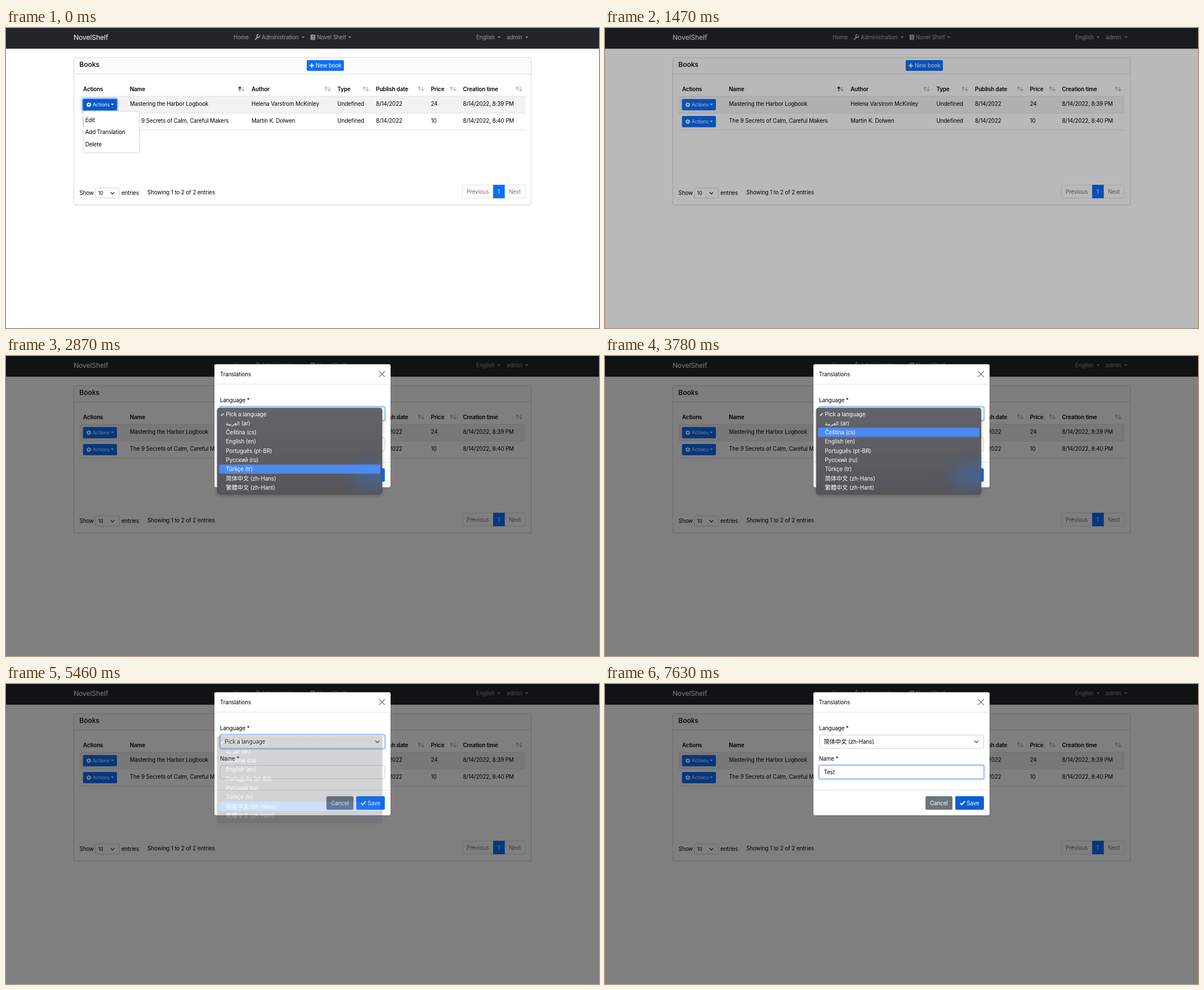
Animation of 1053x532 px, one loop 8 s. Source, as an HTML page:

```html
<!DOCTYPE html>
<html lang="en">
<head>
<meta charset="utf-8">
<title>Book list</title>
<style>
html, body { margin: 0; width: 100%; height: 100%; overflow: hidden; background: #fff; }
svg { display: block; width: 100vw; height: 100vh; }
text {
  font: 9.8px Inter, "Noto Sans CJK SC", "DejaVu Sans", sans-serif;
  letter-spacing: -.01em; fill: #000; white-space: pre;
}
.b { font-weight: 600; }
.s { font-size: 8.6px; }
.w { fill: #fff; }
.nav { fill: #9b9da0; }
.mute { fill: #6c757d; }
.brand { font-size: 12.2px; fill: #fff; }
.head { font-size: 12.2px; font-weight: 500; }
.cjk { font-size: 10.2px; letter-spacing: 0; }
.ar { font-family: "DejaVu Sans", sans-serif; font-size: 9px; letter-spacing: 0; }
</style>
</head>
<body>
<svg id="stage" viewBox="0 0 1053 532" preserveAspectRatio="none"></svg>
<script>
const LOOP = 8000, TICK = 70;
const BLUE = '#0d6efd', LINE = '#dee2e6';

// Drawing helpers
const text = (x, y, str, cls = '') => `<text x="${x}" y="${y}" class="${cls}">${str}</text>`;
const rect = (x, y, w, h, fill, r = 0, extra = '') =>
  `<rect x="${x}" y="${y}" width="${w}" height="${h}" rx="${r}" fill="${fill}" ${extra}/>`;
const path = (d, stroke, width = 1, extra = '') =>
  `<path d="${d}" fill="none" stroke="${stroke}" stroke-width="${width}" ${extra}/>`;
const hline = (x, y, w, color = LINE) => path(`M${x} ${y}h${w}`, color);
const group = (id, body, extra = '') => `<g id="${id}" ${extra}>${body}</g>`;
const caret = (x, y, fill) => `<path d="M${x} ${y}h5.4l-2.7 2.8z" fill="${fill}"/>`;
const chevron = (x, y, s = 3.3) =>
  path(`M${x - s} ${y - s / 2}l${s} ${s}l${s} ${-s}`, '#343a40', 1.3, 'stroke-linecap="round" stroke-linejoin="round"');
const tick = (x, y, s, width) => path(`M${x} ${y}l${s} ${s}l${s * 2} ${-s * 2.2}`, '#fff', width);

function sortIcon(x, active) {
  const up = path(`M${x - 2.8} 112V104.6M${x - 5.5} 107.3l2.7 -2.9l2.7 2.9`, active ? '#222' : '#b5b5b5', 1.3);
  const down = path(`M${x + 2.8} 104V111.4M${x + .1} 108.7l2.7 2.9l2.7 -2.9`, '#b5b5b5', 1.3);
  return up + down;
}

function gear(x, y) {
  return `<g fill="none" stroke="#fff"><circle cx="${x}" cy="${y}" r="2.4" stroke-width="1.9"/>
    <circle cx="${x}" cy="${y}" r="3.6" stroke-width="1.5" stroke-dasharray="1.88"/></g>`;
}

const actionFace = y => gear(147, y + 10) + text(154, y + 13.1, 'Actions', 's w') + caret(186.2, y + 8.2, '#fff');
const actionButton = y => rect(136.7, y, 60.3, 20, BLUE, 2) + actionFace(y);

function focusRing(id, y, h) {
  return group(id,
    rect(379.3, y - 1.2, 294.4, h + 2.4, 'none', 3.5, 'stroke="#0d6efd" stroke-opacity=".27" stroke-width="2.5"') +
    rect(380.5, y, 292, h, 'none', 2.5, 'stroke="#86b7fe"'));
}

function navbar() {
  const gray = '#9b9da0';
  return rect(0, 0, 1053, 36.7, '#222529') +
    text(120, 21, 'NovelShelf', 'brand') +
    text(404, 20, 'Home', 'nav') +
    path('M442.8 20.2l3.8 -3.8', gray, 2.2, 'stroke-linecap="round"') +
    path('M450.2 13.5a2.5 2.5 0 1 1 -2 -1.7', gray, 1.9) +
    text(454, 20, 'Administration', 'nav') + caret(525, 15, gray) +
    rect(540.8, 11.8, 8.4, 9.4, gray, 1.2) +
    path('M543.2 14.2h4.2M543.2 16h4.2M542.3 19.3h6.4', '#222529', .8) +
    text(552, 20, 'Novel Shelf', 'nav') + caret(607.7, 15, gray) +
    text(835, 20, 'English', 'nav') + caret(873, 15, gray) +
    text(889, 20, 'admin', 'nav') + caret(922.2, 15, gray);
}

function page() {
  const cols = [137, 220, 436, 588.5, 657, 754.5, 811.5];
  const heads = ['Actions', 'Name', 'Author', 'Type', 'Publish date', 'Price', 'Creation time'];
  const rows = [
    ['Mastering the Harbor Logbook', 'Helena Varstrom McKinley', 'Undefined', '8/14/2022', '24', '8/14/2022, 8:39 PM'],
    ['The 9 Secrets of Calm, Careful Makers', 'Martin K. Dolwen', 'Undefined', '8/14/2022', '10', '8/14/2022, 8:40 PM']
  ];
  return rect(0, 0, 1053, 532, '#fff') + navbar() +
    rect(120.5, 52.5, 812, 261, '#fff', 2.5, 'stroke="#dcdcdc" filter="url(#soft)"') +
    rect(121, 53, 811, 28, '#000', 2, 'fill-opacity=".01"') + hline(121, 81.5, 811, '#dcdcdc') +
    text(130.3, 69.3, 'Books', 'head') +
    rect(534, 57, 66, 19, BLUE, 2) + path('M538.9 66.5h8M542.9 62.5v8', '#fff', 1.8) +
    text(549.7, 70, 'New book', 'w') +
    rect(130.5, 121, 792, 30, '#f2f2f2') +
    [121, 151, 181].map(y => hline(130.5, y, 792)).join('') +
    heads.map((h, i) => text(cols[i], 111.6, h, 'b')).join('') +
    [418, 571, 639, 737, 794, 911].map((x, i) => sortIcon(x, i === 0)).join('') +
    rows.map((r, n) => r.map((c, i) => text(cols[i + 1], 137.5 + 30 * n, c)).join('')).join('') +
    actionButton(126) + actionButton(156) +
    text(130.5, 296, 'Show') + rect(158.5, 283.5, 43, 18, '#fff', 2, 'stroke="#ced4da"') +
    text(163.8, 296, '10', 's') + chevron(189, 293, 3) + text(205, 296, 'entries') +
    text(251, 295, 'Showing 1 to 2 of 2 entries') +
    rect(810.5, 278.5, 112, 23, '#fff', 2.5, `stroke="${LINE}"`) + rect(865, 278, 20.7, 24, BLUE) +
    text(818, 293.6, 'Previous', 'mute') + text(872.9, 293.6, '1', 'w') + text(893, 293.6, 'Next', 'mute') +
    group('active',
      rect(135.5, 124.8, 62.7, 22.4, 'none', 3, 'stroke="#3184fd" stroke-opacity=".5" stroke-width="2.5"') +
      rect(136.7, 126, 60.3, 20, '#0a58ca', 2) + actionFace(126)) +
    group('menu',
      rect(137.2, 147.5, 99.5, 74, '#fff', 2.5, 'stroke="#d5d5d5"') +
      ['Edit', 'Add Translation', 'Delete'].map((s, i) => text(140.7, 167 + 21.4 * i, s)).join(''));
}

const HANS = '<tspan class="cjk">简体中文</tspan> (zh-Hans)';
const HANT = '<tspan class="cjk" lang="zh-Hant">繁體中文</tspan> (zh-Hant)';

function modal() {
  return rect(370, 14.5, 313, 218.5, '#fff', 3, 'stroke="#000" stroke-opacity=".2"') +
    text(380, 35.6, 'Translations') + path('M662.8 27.3l9.6 9.6M672.4 27.3l-9.6 9.6', '#707070', 1.3, 'stroke-linecap="round"') +
    hline(370.5, 50, 312) + hline(370.5, 188.5, 312) +
    text(380, 81.5, 'Language *') + rect(380.5, 90.5, 292, 23.7, '#fff', 2.5, 'stroke="#ced4da"') +
    focusRing('selectRing', 90.5, 23.7) +
    group('unpicked', text(388.5, 106, 'Pick a language')) + group('picked', text(388.5, 106, HANS)) +
    chevron(659.5, 102.5) +
    text(380, 135.5, 'Name *') + rect(380.5, 144.5, 292, 23.5, '#fff', 2.5, 'stroke="#ced4da"') +
    focusRing('nameRing', 144.5, 23.5) +
    '<text id="typed" x="388.5" y="160"></text>' +
    rect(0, 150.3, .9, 12, '#222', 0, 'id="cursor"') +
    rect(569, 199, 48, 24, '#6c757d', 2.5) + text(577, 214.6, 'Cancel', 'w') +
    rect(622, 199, 50.7, 24, BLUE, 2.5) + rect(622, 199, 50.7, 24, '#0b5ed7', 2.5, 'id="hover"') +
    tick(630.5, 211.2, 2.9, 2) + text(642.3, 214.6, 'Save', 'w');
}

const ROW = 16.32;
function popup() {
  const items = ['Pick a language', '<tspan class="ar">العربية</tspan> (ar)', 'Čeština (cs)', 'English (en)',
    'Português (pt-BR)', 'Русский (ru)', 'Türkçe (tr)', HANS, HANT];
  return rect(375.3, 92.3, 292.4, 152.8, 'url(#panel)', 4, 'stroke="#444448" stroke-width=".7" filter="url(#drop)"') +
    rect(375.5, 92.5, 292, 152.4, 'url(#tint)', 4) +
    rect(378.3, 0, 286.4, ROW, '#4d8af0', 2.5, 'id="mark"') +
    tick(381.5, 103.8, 1.7, 1.2) +
    items.map((s, i) => text(390.5, 106.5 + ROW * i, s, 'w')).join('');
}

const stage = document.getElementById('stage');
stage.innerHTML = `<defs>
  <linearGradient id="panel" x2="0" y2="1"><stop stop-color="#63656b"/><stop offset="1" stop-color="#575559"/></linearGradient>
  <radialGradient id="tint" gradientUnits="userSpaceOnUse" cx="655" cy="212" r="75" gradientTransform="translate(0 74) scale(1 .65)">
    <stop stop-color="#3a6cad" stop-opacity=".6"/><stop offset=".45" stop-color="#486489" stop-opacity=".5"/>
    <stop offset="1" stop-color="#505458" stop-opacity="0"/></radialGradient>
  <filter id="soft" x="-5%" y="-5%" width="110%" height="115%"><feDropShadow dx="0" dy="1" stdDeviation="1.2" flood-opacity=".09"/></filter>
  <filter id="drop" x="-10%" y="-10%" width="120%" height="125%"><feDropShadow dx="0" dy="2" stdDeviation="3" flood-opacity=".28"/></filter>
  </defs>` + page() + rect(0, 0, 1053, 532, '#000', 0, 'id="shade"') + group('modal', modal()) + group('popup', popup());

const el = id => document.getElementById(id);
const ramp = (t, a, b) => Math.min(1, Math.max(0, (t - a) / (b - a)));
const fade = (id, v) => {
  el(id).setAttribute('opacity', v);
  el(id).style.display = v > 0 ? '' : 'none';
};

// Highlighted row of the language list
function markedRow(t) {
  if (t < 2590) return 0;
  if (t < 2730) return 1;
  if (t < 3290) return Math.min(6, 3 + 2 * Math.floor((t - 2730) / TICK));
  if (t < 3780) return Math.max(1, 5 - Math.floor((t - 3290) / TICK));
  if (t < 4340) return Math.min(7, 2 + Math.floor((t - 3780) / TICK));
  return t < 4830 ? 8 : 7;
}

const keys = [6370, 6650, 6860, 7000];
const glyphEnds = [388.5, 394.6, 400.1, 404.9, 408];

function draw(now) {
  const t = Math.floor((now % LOOP) / TICK) * TICK;

  fade('menu', t < 770 ? 1 : 0);
  fade('active', 1 - ramp(t, 720, 910));

  fade('shade', .5 * ramp(t, 1365, 1555));
  fade('modal', ramp(t, 1520, 1670));
  const rest = 1 - ramp(t, 1520, 1820);
  el('modal').setAttribute('transform', `translate(0 ${-31 * rest * rest})`);

  fade('nameRing', t < 4000 ? ramp(t, 1820, 1960) - ramp(t, 2060, 2210) : ramp(t, 5840, 5990));
  fade('selectRing', ramp(t, 2060, 2210) - ramp(t, 5840, 5990));
  fade('unpicked', t < 5530 ? 1 : 0);
  fade('picked', t < 5530 ? 0 : 1);

  fade('popup', t < 2240 ? 0 : 1 - ramp(t, 5330, 5506));
  el('mark').setAttribute('y', 94.6 + ROW * markedRow(t));
  fade('mark', t === 5110 ? 0 : 1);

  const count = keys.filter(k => t >= k).length;
  el('typed').textContent = 'Test'.slice(0, count);
  el('cursor').setAttribute('x', glyphEnds[count]);
  fade('cursor', (t >= 1820 && t < 2100) || (t >= 5880 && t < 7630) ? 1 : 0);
  fade('hover', ramp(t, 7250, 7420));
}

const start = performance.now();
function loop() {
  draw(performance.now() - start);
  requestAnimationFrame(loop);
}
loop();
</script>
</body>
</html>
```
